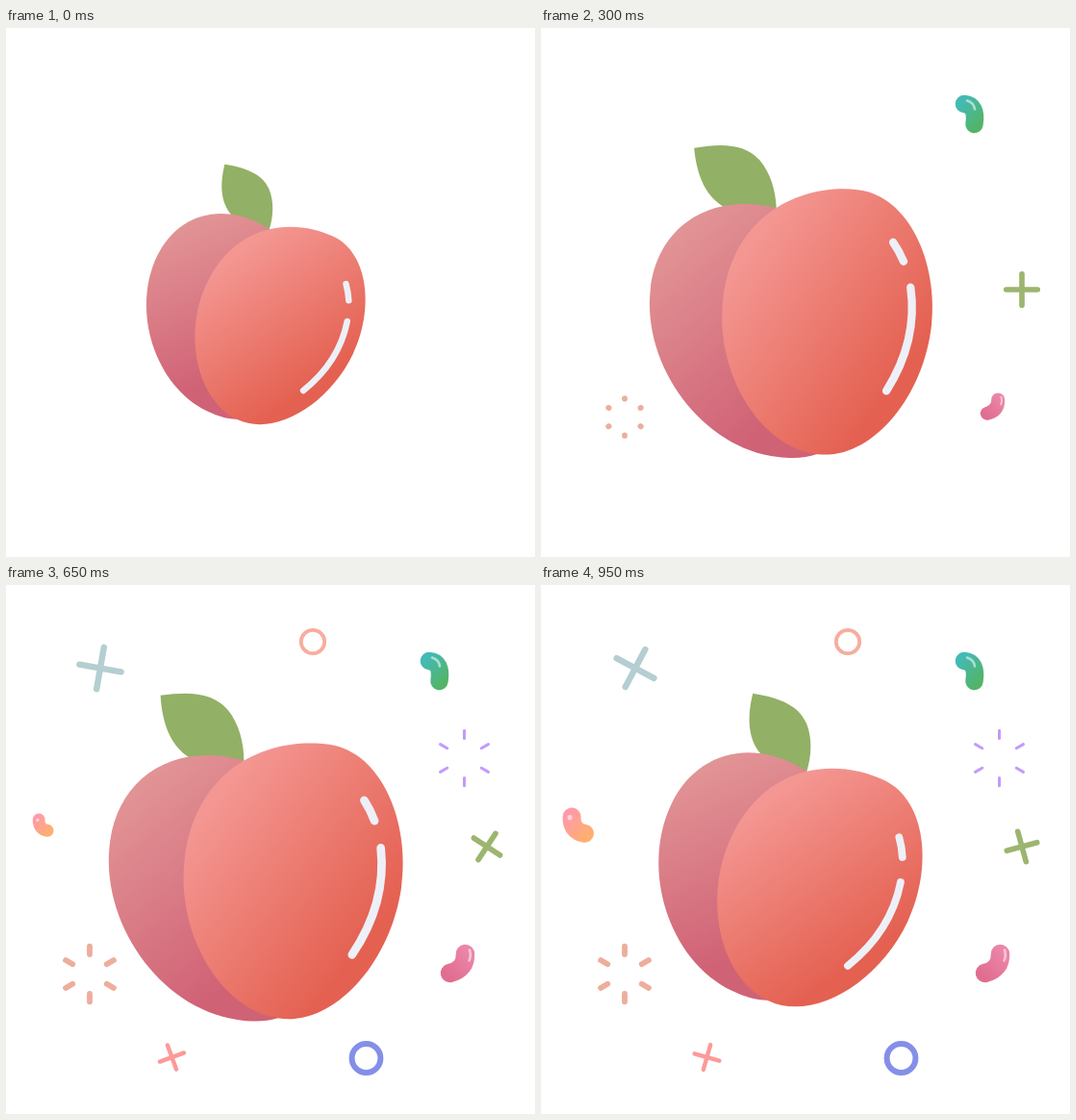
Write an HTML page with a canvas that moves like this. It is 550 by 550 pixels and loops after 1 s.

```html
<!DOCTYPE html>
<html lang="en">
<head>
<meta charset="utf-8">
<title>Peach</title>
<style>
html, body { margin: 0; width: 100%; height: 100%; overflow: hidden; background: #fff; }
canvas { display: block; width: 100%; height: 100%; }
</style>
</head>
<body>
<canvas id="stage" width="550" height="550"></canvas>
<script>
const ctx = document.getElementById('stage').getContext('2d');
const LOOP = 1000, STEP = 50, RAD = Math.PI / 180;
const CX = 261.4, CY = 284.3;

const mix = (a, b, k) => a + (b - a) * k;
const clamp = k => Math.max(0, Math.min(1, k));

// Linear interpolation through [time, value] pairs
function track(t, keys) {
  let [t0, v0] = keys[0];
  for (const [t1, v1] of keys) {
    if (t <= t1) return t1 === t0 ? v1 : mix(v0, v1, clamp((t - t0) / (t1 - t0)));
    [t0, v0] = [t1, v1];
  }
  return v0;
}

function gradient(x0, y0, x1, y1, from, to) {
  const g = ctx.createLinearGradient(x0, y0, x1, y1);
  g.addColorStop(0, from);
  g.addColorStop(1, to);
  return g;
}

function posed(x, y, scale, angle, draw) {
  ctx.save();
  ctx.translate(x, y);
  ctx.rotate(angle * RAD);
  ctx.scale(scale, scale);
  draw();
  ctx.restore();
}

function stroke(path, color, width) {
  ctx.strokeStyle = color;
  ctx.lineWidth = width;
  ctx.stroke(new Path2D(path));
}

function fill(path, color) {
  ctx.fillStyle = color;
  ctx.fill(path);
}

const leaf = new Path2D('M133 126C166 116 190 116 207 131C221 144 229 163 232 183L210 200L180 190C152 182 139 155 133 126Z');
const back = new Path2D('M102 288C102 225 146 181 212 181Q223 181 234 183L320 300L308 451C295 457 282 459 265 459C180 459 102 375 102 288Z');
const front = new Path2D('M184 292C184 190 262 152 320 152C378 152 419 224 419 293C419 376 368 451 309 451C243 451 184 372 184 292Z');

function peach(t) {
  const scale = track(t, [[0, .7185], [450, 1.035], [950, .8655]]);
  const angle = track(t, [[0, 25.6], [450, -3.2], [950, 25.55]]);
  posed(CX, CY, scale, angle, () => {
    ctx.translate(-CX, -CY);
    fill(leaf, '#92b066');
    fill(back, gradient(105, 240, 275, 395, '#e29495', '#d06276'));
    fill(front, gradient(200, 235, 395, 345, '#f49793', '#e46151'));
    stroke('M366 206Q374 215 380 226M391 254Q406 312 377 372', '#eef0f7', 9);
  });
}

function cross(x, y, half, width, color, angle, scale = 1) {
  posed(x, y, scale, angle, () =>
    stroke(`M${-half} 0H${half}M0 ${-half}V${half}`, color, width));
}

function ring(x, y, r, width, color) {
  ctx.beginPath();
  ctx.arc(x, y, r, 0, 2 * Math.PI);
  ctx.strokeStyle = color;
  ctx.lineWidth = width;
  ctx.stroke();
}

function burst(x, y, width, color, grow) {
  const inner = mix(19, 20.5, grow), outer = mix(19.4, 28.8, grow);
  for (let a = 30; a < 360; a += 60) {
    posed(x, y, 1, a, () => stroke(`M${inner} 0H${outer}`, color, width));
  }
}

// A bean is a thick curved stroke with a soft shine on top
function bean(x, y, scale, width, body, paint, shine, shineWidth) {
  posed(x, y, scale, 0, () => {
    stroke(body, paint, width);
    stroke(shine, 'rgba(255,255,255,.55)', shineWidth);
  });
}

function confetti(t) {
  if (t >= 150) {
    bean(469.5, 393.5, clamp(.51 + (t - 200) * .00205), 19.5,
      'M8 -10Q8.5 6 -8 10', gradient(-12, 12, 12, -12, '#e06d90', '#ec86a8'),
      'M12.5 -14Q14.5 -8 12 -3', 2.6);
  }
  if (t >= 250) {
    bean(446, 90, 1, 18.5,
      'M-6 -11Q7.5 -10 4.5 10', gradient(-12, -10, 10, 10, '#43bab5', '#53b468'),
      'M-3 -14.5Q4 -12.5 5 -5.5', 2.6);
    cross(500, 272, 16.3, 5.6, '#9cb56f', -.162 * (t - 300));
  }
  if (t >= 300) burst(87, 404.5, 5.8, '#edae9b', clamp((t - 300) / 100));
  if (t >= 350) {
    cross(172.5, 491, 13.4, 4.4, '#fd9999',
      track(t, [[350, 61], [400, 45], [550, -3], [750, -37], [950, -74]]));
  }
  if (t >= 450) burst(476.5, 180, 3, '#c39afd', clamp((t - 450) / 100));
  if (t >= 500) {
    cross(98, 86.5, 22, 6.4, '#b4ced2', 34 - .24 * (t - 550), clamp(.94 + (t - 550) * .0012));
    ring(374.5, 492, 14.9, 6, '#848fe8');
  }
  if (t >= 600) {
    bean(38.5, 249.5, clamp(.87 + (t - 750) * .002), 19,
      'M-6.5 -8.5Q-7 6.5 7 8.8', gradient(-10, -10, 12, 10, '#ff9ba6', '#ffaf70'),
      'M-8.5 -8V-7.6', 5);
  }
  if (t >= 650) ring(319, 59, 12.2, 3.8, '#f7ad9f');
}

function frame(now) {
  const t = Math.floor((now % LOOP) / STEP) * STEP;
  ctx.clearRect(0, 0, 550, 550);
  ctx.lineCap = 'round';
  ctx.lineJoin = 'round';
  confetti(t);
  peach(t);
}

let start;
function tick(now) {
  start ??= now;
  frame(now - start);
  requestAnimationFrame(tick);
}
frame(0);
requestAnimationFrame(tick);
</script>
</body>
</html>
```
